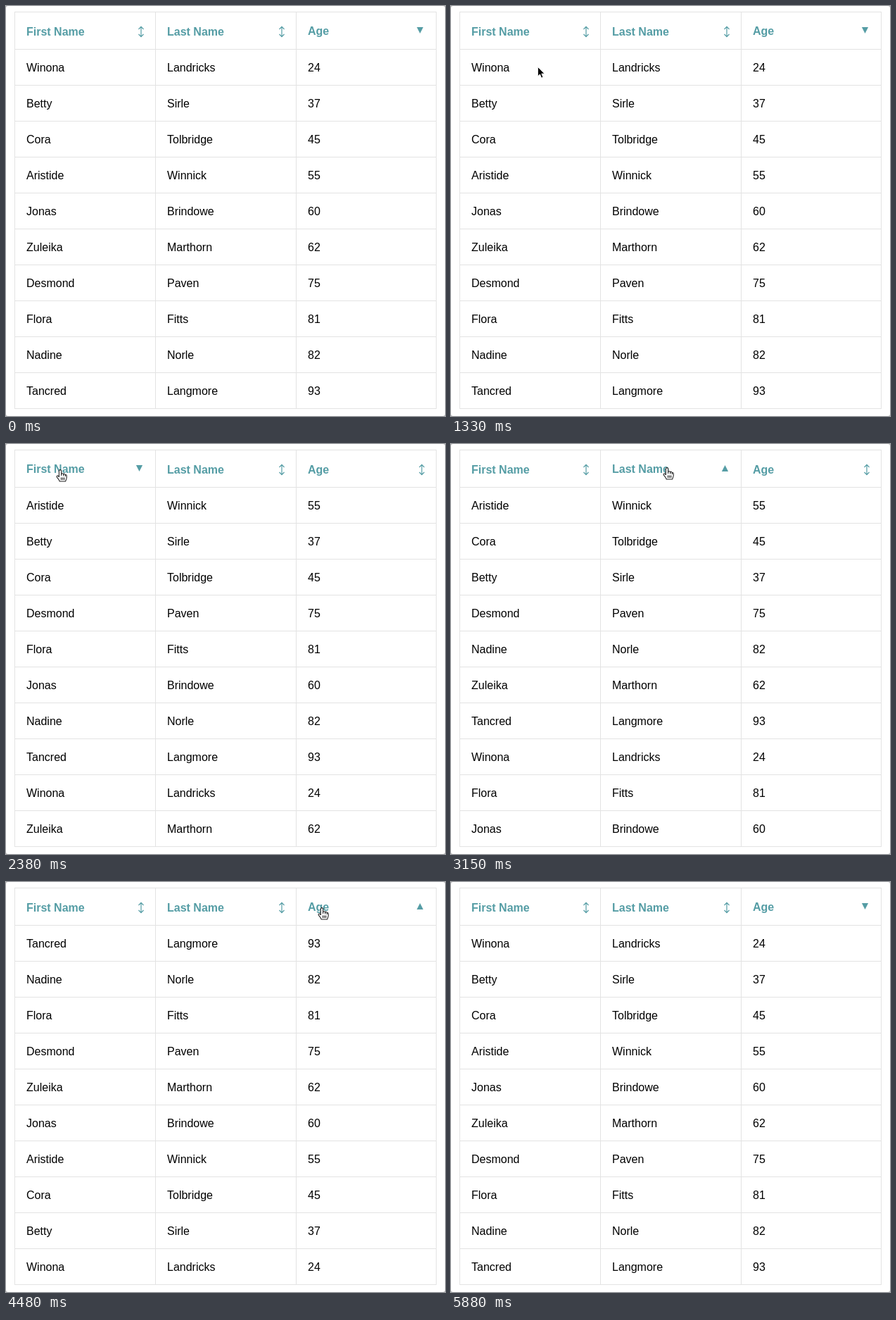
Write an HTML page that moves like this. It is 624x582 px and loops after 6.02 s.

```html
<!DOCTYPE html>
<html lang="en">
<head>
<meta charset="utf-8">
<title>Sortable table</title>
<style>
html, body { margin: 0; width: 100%; height: 100%; overflow: hidden; background: #bdbdbd; }
svg { display: block; width: 624px; height: 582px; }
text { font: 16px "Liberation Sans", Arial, sans-serif; fill: #000; }
.head { font-weight: bold; fill: #559da5; }
.mark { fill: #559da5; }
.both { fill: none; stroke: #559da5; stroke-width: 1.2; }
.grid { stroke: #e3e3e3; fill: none; }
</style>
</head>
<body>
<svg id="stage" viewBox="0 0 624 582">
  <rect width="624" height="582" rx="3" fill="#fff"/>
</svg>
<script>
const LOOP = 6020, STEP = 70, COL = 200, ROW = 51;
const stage = document.getElementById('stage');

function add(tag, attrs, parent = stage) {
  const el = document.createElementNS('http://www.w3.org/2000/svg', tag);
  for (const k in attrs) el.setAttribute(k, attrs[k]);
  return parent.appendChild(el);
}
const show = (el, on) => el.setAttribute('visibility', on ? 'visible' : 'hidden');

const people = [
  ['Winona', 'Landricks', 24], ['Betty', 'Sirle', 37],
  ['Cora', 'Tolbridge', 45], ['Aristide', 'Winnick', 55],
  ['Jonas', 'Brindowe', 60], ['Zuleika', 'Marthorn', 62],
  ['Desmond', 'Paven', 75], ['Flora', 'Fitts', 81],
  ['Nadine', 'Norle', 82], ['Tancred', 'Langmore', 93]
];

const clicks = [
  { down: 1610, up: 1750, col: 0 },
  { down: 2240, up: 2380, col: 0 },
  { down: 3080, up: 3150, col: 1 },
  { down: 3570, up: 3710, col: 1 },
  { down: 4340, up: 4480, col: 2 },
  { down: 4970, up: 5110, col: 2 }
];
// the pointer rests between moves
const moves = [
  { from: 70, to: 630, x: 323, y: 337 },
  { from: 910, to: 1470, x: 86, y: 39 },
  { from: 1890, to: 2100, x: 77, y: 36 },
  { from: 2380, to: 2730, x: 307, y: 33 },
  { from: 3150, to: 3430, x: 289, y: 36 },
  { from: 3990, to: 4340, x: 449, y: 36 },
  { from: 5110, to: 5530, x: 400, y: 530 }
];

function sorted(col, desc) {
  const sign = desc ? -1 : 1;
  return [...people].sort((a, b) => a[col] < b[col] ? -sign : sign);
}

// a first click sorts downwards, another on the same column reverses it
const states = [{ at: 0, col: 2, desc: false, rows: people }];
for (const { up, col } of clicks) {
  const last = states[states.length - 1];
  const desc = col !== last.col || !last.desc;
  states.push({ at: up, col, desc, rows: sorted(col, desc) });
}

let lines = 'M12 8.5H612';
for (let i = 0; i <= people.length; i++) lines += `M12 ${61.5 + ROW * i}H612`;
for (let i = 0; i < 4; i++) lines += `M${Math.min(12.5 + COL * i, 611.5)} 8V572`;
add('path', { d: lines, class: 'grid' });

const heads = ['First Name', 'Last Name', 'Age'].map((label, c) => {
  const end = Math.min(192 + COL * c, 591), mid = end - 2.5;
  const text = add('text', { x: 29 + COL * c, class: 'head' });
  text.textContent = label;
  const tip = (y, dy) => `M${end - 3.5} ${y + dy}L${end} ${y}L${end + 3.5} ${y + dy}`;
  const both = add('path', { class: 'both', d: `M${end} 29.5V43.5${tip(29.3, 3.7)}${tip(43.7, -3.7)}` });
  const triangle = (base, top) =>
    add('path', { class: 'mark', d: `M${mid - 4.6} ${base}H${mid + 4.6}L${mid} ${top}Z` });
  return { text, both, up: triangle(39, 30), down: triangle(30, 39) };
});

const cells = people.map((_, r) => [0, 1, 2].map(c =>
  add('text', { x: 29 + COL * c, y: 93 + ROW * r })));

const pointer = add('g', {});
const ring = add('circle', { r: 29.5, fill: 'none', stroke: '#555', 'stroke-width': 2 }, pointer);
const hand = add('g', { stroke: '#222', 'stroke-width': 1.1, 'stroke-linejoin': 'round' }, pointer);
add('path', {
  fill: '#fff',
  d: 'M-1.6 1.8Q0-.6 1.6 1.8V6.2Q3.7 5 4.7 6.7Q6.4 5.8 7.3 7.6Q9.2 7.2 9.2 9.3V12Q8.8 14 7.6 17H-.8Q-1.6 14.4-4.8 10.8Q-5.2 8.6-3.3 9L-1.6 10.6Z'
}, hand);
add('path', { fill: 'none', d: 'M1.6 6V9M4.7 7V9.4M7.3 8V10M1.5 11.5V15M3.6 11.5V15M5.7 11.5V15' }, hand);
const arrow = add('path', {
  fill: '#000', stroke: '#fff', 'stroke-width': 1,
  d: 'M.3.3V14L3.4 11L5.5 16.2L8 15.2L5.8 10.2H10Z'
}, pointer);

let current;
function setTable(state) {
  if (state === current) return;
  current = state;
  const { col, desc, rows } = state;
  heads.forEach((h, c) => {
    const on = c === col;
    h.text.setAttribute('y', on ? 41 : 42);
    show(h.both, !on);
    show(h.up, on && desc);
    show(h.down, on && !desc);
  });
  cells.forEach((row, r) => row.forEach((cell, c) => {
    cell.textContent = rows[r][c];
  }));
}

function tipAt(t) {
  let x = 372, y = 530;
  for (const m of moves) {
    const k = Math.min(1, Math.max(0, (t - m.from) / (m.to - m.from)));
    const ease = k * k * (3 - 2 * k);
    x += (m.x - x) * ease;
    y += (m.y - y) * ease;
  }
  return { x: Math.round(x), y: Math.round(y) };
}

function draw(time) {
  const t = Math.floor(time % LOOP / STEP) * STEP;
  setTable(states.filter(s => s.at <= t).pop());
  const seen = t >= moves[0].from && t < moves[moves.length - 1].to;
  pointer.style.display = seen ? '' : 'none';
  const { x, y } = tipAt(t);
  pointer.setAttribute('transform', `translate(${x} ${y})`);
  show(hand, y < 61);
  show(arrow, y >= 61);
  show(ring, clicks.some(c => t >= c.down && t < c.up));
}

let start;
function tick(now) {
  start ??= now;
  draw(now - start);
  requestAnimationFrame(tick);
}
draw(0);
requestAnimationFrame(tick);
</script>
</body>
</html>
```
